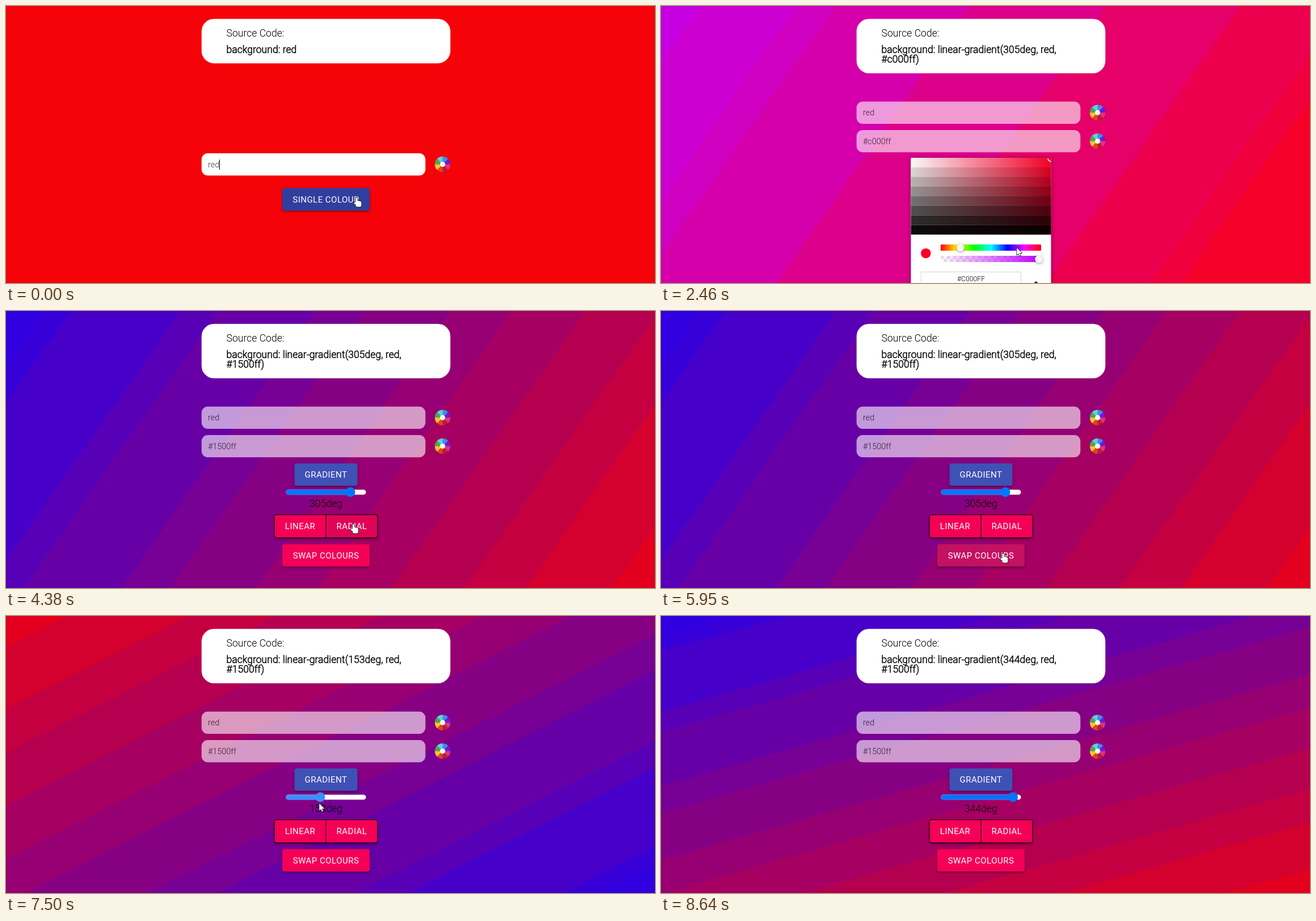
Recreate the animation shown at these times as an HTML page with a canvas. Size 1144 by 489 pixels, loop 9070 ms.

```html
<!DOCTYPE html>
<html lang="en">
<head>
<meta charset="utf-8">
<title>Gradient maker</title>
<style>
html, body { margin: 0; width: 100%; height: 100%; overflow: hidden; background: #f60309; }
canvas { display: block; width: 1144px; height: 489px; }
</style>
</head>
<body>
<canvas id="stage" width="1144" height="489"></canvas>
<script>
const W = 1144, H = 489, MID = 564, LOOP = 9070;
const ctx = document.getElementById('stage').getContext('2d');
const FAMILY = 'Roboto, "Open Sans", sans-serif';
const PINK = '#f50057', RED = [255, 0, 0];
const WHEEL = ['#3f8fe0', '#6b18e6', '#e0356f', '#b51c3a', '#e8401c', '#f6c62c', '#4fa64f', '#5fd0e0'];
const HUE_BAR = { x: 493, w: 177 };

const rect = (x, y, w, h) => ({ x, y, w, h });
const SINGLE = rect(487, 321.5, 154, 39.5);
const GRADIENT = rect(508.5, 269, 111, 39.5);
const LINEAR = rect(473, 359.5, 91, 41);
const RADIAL = rect(564, 359.5, 91, 41);
const SWAP = rect(487, 411.5, 154, 39.5);
const WHEEL_2 = rect(756, 225, 27.4, 27.4);

// Smooth 0..1 between two times
function ease(t, from, to) {
  const u = Math.min(1, Math.max(0, (t - from) / (to - from)));
  return u * u * (3 - 2 * u);
}
const mix = (a, b, u) => a + (b - a) * u;

const hueAt = t => 285.18 * ease(t, 2030, 2440) - 40.24 * ease(t, 2520, 3300);
const angleAt = t => 305 - 205 * ease(t, 6800, 7850) + 244 * ease(t, 7850, 8300);
const thumbX = angle => 500.6 + 0.349 * angle;
const hueX = hue => HUE_BAR.x + HUE_BAR.w * hue / 360;

// The pointer's tour: where it goes, arrival, departure
const on = (r, dx = 0) => () => [r.x + r.w / 2 + dx, r.y + 17];
const onWheel = () => [768, 232];
const TOUR = [
  [on(SINGLE, 54), 0, 400],
  [onWheel, 1180, 1320],
  [() => [684, 271], 1840, 1930],
  [t => [hueX(hueAt(t)) - 6, 427], 2080, 3700],
  [onWheel, 3900, 4000],
  [on(RADIAL, 3), 4340, 4800],
  [on(LINEAR), 5150, 5350],
  [on(SWAP, 39), 5850, 6500],
  [t => [thumbX(angleAt(t + 20)), 331], 6740, 8400],
  [() => [1110, 500], 8630, LOOP]
];

function pointerAt(t) {
  const i = TOUR.findIndex(stop => t <= stop[2]);
  const [place, arrive] = TOUR[i], to = place(t);
  if (t >= arrive) return to;
  const [last, , left] = TOUR[i - 1], from = last(t);
  const u = ease(t, left, arrive);
  return from.map((v, k) => mix(v, to[k], u));
}

const rgb = c => `rgb(${c.map(Math.round).join(',')})`;
const hex = c => '#' + c.map(v => Math.round(v).toString(16).padStart(2, '0')).join('');
const hueRgb = h => [0, 240, 120].map(o => {
  const k = ((h + o) % 360) / 60;
  return 255 * Math.min(1, Math.max(0, Math.abs(k - 3) - 1));
});

function box(x, y, w, h, r, fill) {
  ctx.beginPath();
  ctx.roundRect(x, y, w, h, r);
  ctx.fillStyle = fill;
  ctx.fill();
}

function disc(x, y, r, fill) {
  ctx.beginPath();
  ctx.arc(x, y, r, 0, 7);
  ctx.fillStyle = fill;
  ctx.fill();
}

function shaded(blur, dy, paint) {
  ctx.save();
  ctx.shadowColor = 'rgba(0,0,0,0.42)';
  ctx.shadowBlur = blur;
  ctx.shadowOffsetY = dy;
  paint();
  ctx.restore();
}

function text(s, x, y, size, { fill = '#000', align = 'left', weight = 300, spacing = 0, bold = false } = {}) {
  ctx.font = `${weight} ${size}px ${FAMILY}`;
  ctx.textAlign = align;
  ctx.letterSpacing = spacing + 'px';
  ctx.fillStyle = ctx.strokeStyle = fill;
  ctx.fillText(s, x, y);
  if (bold) {
    ctx.lineWidth = 0.5;
    ctx.lineJoin = 'round';
    ctx.strokeText(s, x, y);
  }
}

// Adds hard colour bands wherever a channel crosses a level
function bands(g, a, b) {
  const edges = [0, 1];
  for (let k = 0; k < 3; k++) {
    for (let v = 39; v < 250; v += 40.8) {
      const e = (v - a[k]) / (b[k] - a[k]);
      if (e > 0 && e < 1) edges.push(e);
    }
  }
  edges.sort((p, q) => p - q);
  for (let i = 1; i < edges.length; i++) {
    const mid = mix(0.5, (edges[i - 1] + edges[i]) / 2, 0.8);
    const c = rgb(a.map((v, k) => mix(v, b[k], mid)));
    g.addColorStop(edges[i - 1], c);
    g.addColorStop(edges[i], c);
  }
  return g;
}

function backdrop(s) {
  ctx.fillStyle = '#f60309';
  ctx.fillRect(0, 0, W, H);
  if (!s.second) return;
  const [a, b] = s.pair;
  ctx.save();
  ctx.translate(W / 2, H / 2);
  if (s.radial) {
    ctx.scale(W / H, 1);
    ctx.fillStyle = bands(ctx.createRadialGradient(0, 0, 0, 0, 0, H / Math.SQRT2), a, b);
  } else {
    const r = s.angle * Math.PI / 180, sx = Math.sin(r), sy = -Math.cos(r);
    const half = (W * Math.abs(sx) + H * Math.abs(sy)) / 2;
    ctx.fillStyle = bands(ctx.createLinearGradient(-sx * half, -sy * half, sx * half, sy * half), a, b);
  }
  ctx.fillRect(-W / 2, -H / 2, W, H);
  ctx.restore();
}

function codeLines(s) {
  const [a, b] = s.names;
  if (s.single) return ['red'];
  if (s.radial) return [`radial-gradient(${a}, ${b})`];
  const head = `linear-gradient(${s.angle}deg, ${a},`;
  return s.second ? [head, b + ')'] : [head + ' )'];
}

function card(s) {
  const lines = codeLines(s);
  lines[0] = 'background: ' + lines[0];
  box(344.7, 22.7, 438.6, 60.9 + 17.6 * lines.length, 22, '#fff');
  text('Source Code:', 388.5, 54, 17.6);
  lines.forEach((l, i) => text(l, 388.5, 82.5 + 17.6 * i, 17.6, { bold: true }));
}

function field(y, value, focus) {
  box(344.7, y, 394.6, 39.2, 11, focus ? '#fff' : 'rgba(255,255,255,0.6)');
  text(value, 356, y + 24.7, 14.4, { fill: 'rgba(0,0,0,0.78)' });
  if (focus) {
    ctx.fillStyle = '#000';
    ctx.fillRect(376, y + 11, 1, 18);
  }
  const cx = 769.6, cy = y + 19.5;
  WHEEL.forEach((c, i) => {
    ctx.beginPath();
    ctx.moveTo(cx, cy);
    ctx.arc(cx, cy, 13.7, (i - 2) * Math.PI / 4, (i - 1) * Math.PI / 4 + 0.02);
    ctx.fillStyle = c;
    ctx.fill();
  });
  disc(cx, cy, 4.6, '#f4f6fa');
}

const over = ([x, y], r) => x >= r.x && x <= r.x + r.w && y >= r.y && y <= r.y + r.h;

function label(s, r) {
  text(s, r.x + r.w / 2, r.y + 25.2, 15.1, { fill: '#fff', align: 'center', weight: 400, spacing: 0.43 });
}

function button(s, r, fill) {
  shaded(4, 2, () => box(r.x, r.y, r.w, r.h, 4, fill));
  label(s, r);
}

function slider(s) {
  const x = thumbX(s.angle), blue = s.drag ? '#3a8fff' : '#0075ff';
  box(493.5, 315.5, 141, 8.8, 4.4, '#fff');
  box(493.5, 315.5, x - 493.5, 8.8, 4.4, blue);
  disc(x, 319.8, 8.5, blue);
  text(s.angle + 'deg', MID, 345.5, 17.6, { align: 'center' });
}

function controls(s) {
  button('GRADIENT', GRADIENT, '#3f51b5');
  slider(s);
  const { x, y, w, h } = LINEAR;
  shaded(4, 2, () => box(x, y, w * 2, h, 4, PINK));
  for (const r of [LINEAR, RADIAL]) {
    if (over(s.cursor, r)) box(r.x, r.y, r.w, r.h, 4, '#e00457');
  }
  ctx.strokeStyle = '#16000a';
  ctx.lineWidth = 1.2;
  ctx.beginPath();
  ctx.roundRect(x + 0.2, y + 0.2, w * 2 - 0.4, h - 0.4, 4);
  ctx.moveTo(MID, y);
  ctx.lineTo(MID, y + h);
  ctx.stroke();
  label('LINEAR', LINEAR);
  label('RADIAL', RADIAL);
  button('SWAP COLOURS', SWAP, over(s.cursor, SWAP) ? '#c51162' : PINK);
}

const knob = (x, y) => shaded(4, 1, () => disc(x, y, 6.8, '#f8f8f8'));

function shadeArea(base, marked) {
  const x = 440.5, y = 268, w = 247, rows = 8, step = 135.5 / rows;
  const g = ctx.createLinearGradient(x, 0, x + w, 0);
  g.addColorStop(0, '#fff');
  g.addColorStop(1, rgb(base));
  box(x, y, w, 135.5, [2, 2, 0, 0], g);
  for (let i = 0; i < rows; i++) {
    ctx.fillStyle = `rgba(0,0,0,${0.03 + i * 0.132})`;
    ctx.fillRect(x, y + i * step, w, step);
  }
  if (!marked) return;
  ctx.beginPath();
  ctx.arc(x + w, y + 1, 5.5, Math.PI / 2, Math.PI);
  ctx.strokeStyle = '#fff';
  ctx.lineWidth = 1.5;
  ctx.stroke();
}

function picker(s) {
  const chosen = s.second || RED;
  const live = s.t > 2520;
  const base = live ? chosen : [250, 0, 40];
  shaded(8, 2, () => box(440.5, 268, 247, 260, 2, '#fff'));
  shadeArea(base, s.second);
  disc(466.8, 436.5, 8.8, rgb(base));

  const { x, w } = HUE_BAR;
  const rainbow = ctx.createLinearGradient(x, 0, x + w, 0);
  for (let i = 0; i <= 6; i++) rainbow.addColorStop(i / 6, rgb(hueRgb(i * 60)));
  box(x, 421, w, 11, 1, rainbow);

  ctx.fillStyle = '#e4e4e4';
  for (let i = 0; i < 32; i++) ctx.fillRect(x + i * 5.5, 441 + (i % 2) * 5.5, 5.5, 5.5);
  const alpha = ctx.createLinearGradient(x, 0, x + w, 0);
  alpha.addColorStop(0, hex(chosen) + '00');
  alpha.addColorStop(1, hex(chosen));
  box(x, 441, w, 11, 1, alpha);
  const spot = hueX(s.hue);
  knob(live ? spot : Math.min(spot, 528), 426.5);
  knob(666, 447);

  ctx.strokeStyle = '#d6d6d6';
  ctx.lineWidth = 1;
  ctx.strokeRect(458.5, 469.5, 176, 23);
  text(hex(chosen).toUpperCase(), 546.5, 485.5, 12.2, { align: 'center' });
  ctx.beginPath();
  ctx.moveTo(657, 491);
  ctx.lineTo(661, 487);
  ctx.lineTo(665, 491);
  ctx.strokeStyle = '#222';
  ctx.lineWidth = 2;
  ctx.stroke();
}

// Finger, knuckles, palm and thumb as rounded boxes
function handShape() {
  ctx.roundRect(-1.5, -0.6, 3, 12, 1.5);
  for (let i = 1; i < 4; i++) ctx.roundRect(i * 2.3 - 1.5, 4.4 + i * 0.6, 3, 7, 1.5);
  ctx.roundRect(-1.5, 8.5, 9.8, 7.6, 2.5);
  ctx.roundRect(-4.4, 7.8, 4, 4, 1.8);
}

function arrowShape() {
  ctx.lineTo(0, 0);
  ctx.lineTo(0, 12.5);
  ctx.lineTo(2.8, 9.9);
  ctx.lineTo(4.7, 14.2);
  ctx.lineTo(6.6, 13.4);
  ctx.lineTo(4.8, 9.3);
  ctx.lineTo(8.8, 9);
  ctx.closePath();
}

function pointer(s) {
  const buttons = s.single ? [SINGLE] : s.open ? [] : [GRADIENT, LINEAR, RADIAL, SWAP];
  const hand = [WHEEL_2, ...buttons].some(r => over(s.cursor, r));
  ctx.save();
  ctx.translate(...s.cursor);
  ctx.beginPath();
  (hand ? handShape : arrowShape)();
  ctx.lineWidth = 1.6;
  ctx.strokeStyle = '#111';
  ctx.fillStyle = '#fff';
  ctx.stroke();
  ctx.fill();
  ctx.restore();
}

function scene(t) {
  const hue = hueAt(t);
  const second = t >= 1900 ? hueRgb(hue) : null;
  const s = {
    t, hue, second,
    single: t < 330,
    open: t >= 1260 && t < 3960,
    radial: t >= 4740 && t < 5300,
    drag: t >= 6760 && t < 8440,
    angle: Math.round(angleAt(t)),
    cursor: pointerAt(t),
    pair: [RED, second],
    names: ['red', second ? hex(second) : '']
  };
  if (t >= 6080 && t < 6480) {
    s.pair.reverse();
    s.names.reverse();
  }
  return s;
}

function draw(now) {
  const s = scene(now % LOOP);
  backdrop(s);
  card(s);
  if (s.single) {
    field(260, 'red', true);
    button('SINGLE COLOUR', SINGLE, '#303f9f');
  } else {
    s.names.forEach((name, i) => field(168.7 + i * 50.4, name, false));
    if (s.open) picker(s);
    else controls(s);
  }
  pointer(s);
}

let start = null;
function tick(now) {
  if (start === null) start = now;
  draw(now - start);
  requestAnimationFrame(tick);
}
draw(0);
requestAnimationFrame(tick);
</script>
</body>
</html>
```
